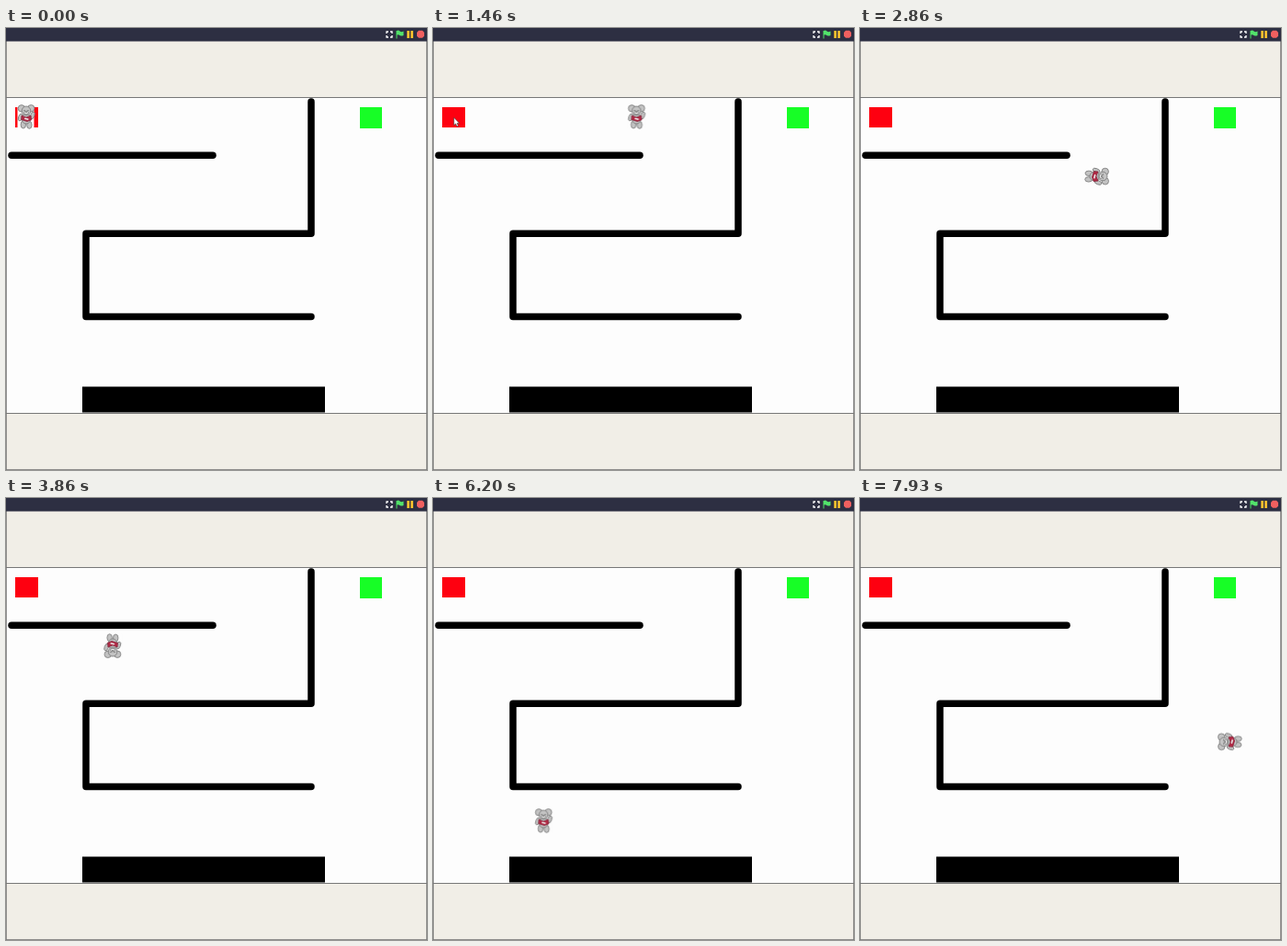
These frames come from a looping animation (458x480 px, 8 s). An HTML page:

```html
<!DOCTYPE html>
<html lang="en">
<head>
<meta charset="utf-8">
<title>Maze walk</title>
<style>
  html, body { margin: 0; width: 100%; height: 100%; overflow: hidden; background: #f1eee7; }
  svg { display: block; width: 458px; height: 480px; }
  .walker { animation: walk 8s infinite; }
  .turner { animation: turn 8s step-end infinite; }
  .pointer { animation: idle 8s step-end infinite; }

  /* Each leg of the walk slows slightly, then rests at the corner. */
  @keyframes walk {
    0%, 7.75% { transform: translate(22px, 96px); animation-timing-function: cubic-bezier(.4, .5, .8, .95); }
    21.625%, 27.125% { transform: translate(258px, 96px); animation-timing-function: cubic-bezier(.4, .5, .8, .95); }
    35%, 42.625% { transform: translate(258px, 161px); animation-timing-function: cubic-bezier(.4, .5, .8, .95); }
    53.25%, 58.3125% { transform: translate(30px, 161px); animation-timing-function: cubic-bezier(.4, .5, .8, .95); }
    68.25%, 74.25% { transform: translate(30px, 354px); animation-timing-function: cubic-bezier(.4, .5, .8, .95); }
    90.75%, 96.6875% { transform: translate(402px, 338px); animation-timing-function: linear; }
    100% { transform: translate(402px, 239px); }
  }
  @keyframes turn {
    0% { transform: rotate(0deg); }
    27.125% { transform: rotate(90deg); }
    42.625% { transform: rotate(180deg); }
    58.3125% { transform: rotate(90deg); }
    74.25% { transform: rotate(0deg); }
    96.6875%, 100% { transform: rotate(-90deg); }
  }
  @keyframes idle {
    0% { visibility: hidden; }
    .75% { visibility: visible; }
    33.25%, 100% { visibility: hidden; }
  }
</style>
</head>
<body>
<svg viewBox="0 0 458 480">
  <rect width="458" height="480" fill="#f1eee7"/>
  <rect y="75" width="458" height="344" fill="#fdfdfd"/>
  <path d="M0 75.5H458M0 418.5H458" stroke="#777" fill="none"/>
  <path d="M.5 14V480M457.5 14V480M0 479.5H458" stroke="#777" stroke-width=".8" fill="none"/>

  <rect width="458" height="14.5" fill="#2d2f42"/>
  <path d="M414 6V4H416M418 4H420V6M420 8V10H418M416 10H414V8" fill="none" stroke="#fff" stroke-width="1.3"/>
  <path d="M425 3V11.5" stroke="#45b85a" stroke-width="1.3"/>
  <path d="M425 3Q427 2 428.5 3.5T432.5 3.5V8Q430 9 428.5 8T425 7.5Z" fill="#52e36b"/>
  <path d="M437.6 3V11M441.6 3V11" stroke="#ffc52e" stroke-width="2.6"/>
  <path d="M449 2.7H453L455 4.7V8.7L453 10.7H449L447 8.7V4.7Z" fill="#f0605f"/>

  <rect x="10" y="86" width="25" height="22" fill="#fe0010"/>
  <rect x="385" y="86" width="24" height="23" fill="#17fe26"/>
  <g fill="none" stroke="#000" stroke-width="7.5" stroke-linecap="round" stroke-linejoin="round">
    <path d="M6 138.3H225"/>
    <path d="M332 80V223.3H87V313.5H332"/>
  </g>
  <rect x="83" y="389.5" width="264" height="28" fill="#000"/>

  <g class="walker"><g class="turner">
    <rect x="-9.5" y="-13.5" width="18" height="27" fill="#fdfdfd"/>
    <g fill="#c3c3c3" stroke="#777" stroke-width=".8">
      <ellipse cx="-3.2" cy="9" rx="2.7" ry="4"/>
      <ellipse cx="3.4" cy="9.3" rx="2.7" ry="4"/>
      <ellipse cx="-6.3" cy="1" rx="2.1" ry="4" transform="rotate(20 -6.3 1)"/>
      <ellipse cx="6.8" cy="-1" rx="2.1" ry="4" transform="rotate(20 6.8 -1)"/>
      <ellipse cx="0" cy="2.5" rx="5" ry="5.5"/>
      <path d="M-5-1L0 1.2L5-1L5.5 3.8L1 5.5L-5.3 3.6Z" fill="#b32945" stroke="#84243a"/>
      <path d="M-1.8 2.3L2.4 3.2" stroke="#eee" stroke-width="1.5"/>
      <circle cx="-5.1" cy="-8.7" r="3.7"/>
      <circle cx="5.3" cy="-8.8" r="3.7"/>
      <ellipse cx="0" cy="-6" rx="4.8" ry="5"/>
      <ellipse cx="0" cy="-4" rx="2.4" ry="1.8" fill="#eee"/>
    </g>
    <path d="M-2-7V-6M2-7V-6M-.8-4.6H.8" stroke="#555" stroke-width=".9"/>
  </g></g>

  <path class="pointer" d="M22.8 97.3V105.6L24.7 103.9L26 107L27.5 106.3L26.2 103.4H28.7Z" fill="#fff" stroke="#333" stroke-width=".6"/>
</svg>
</body>
</html>
```
